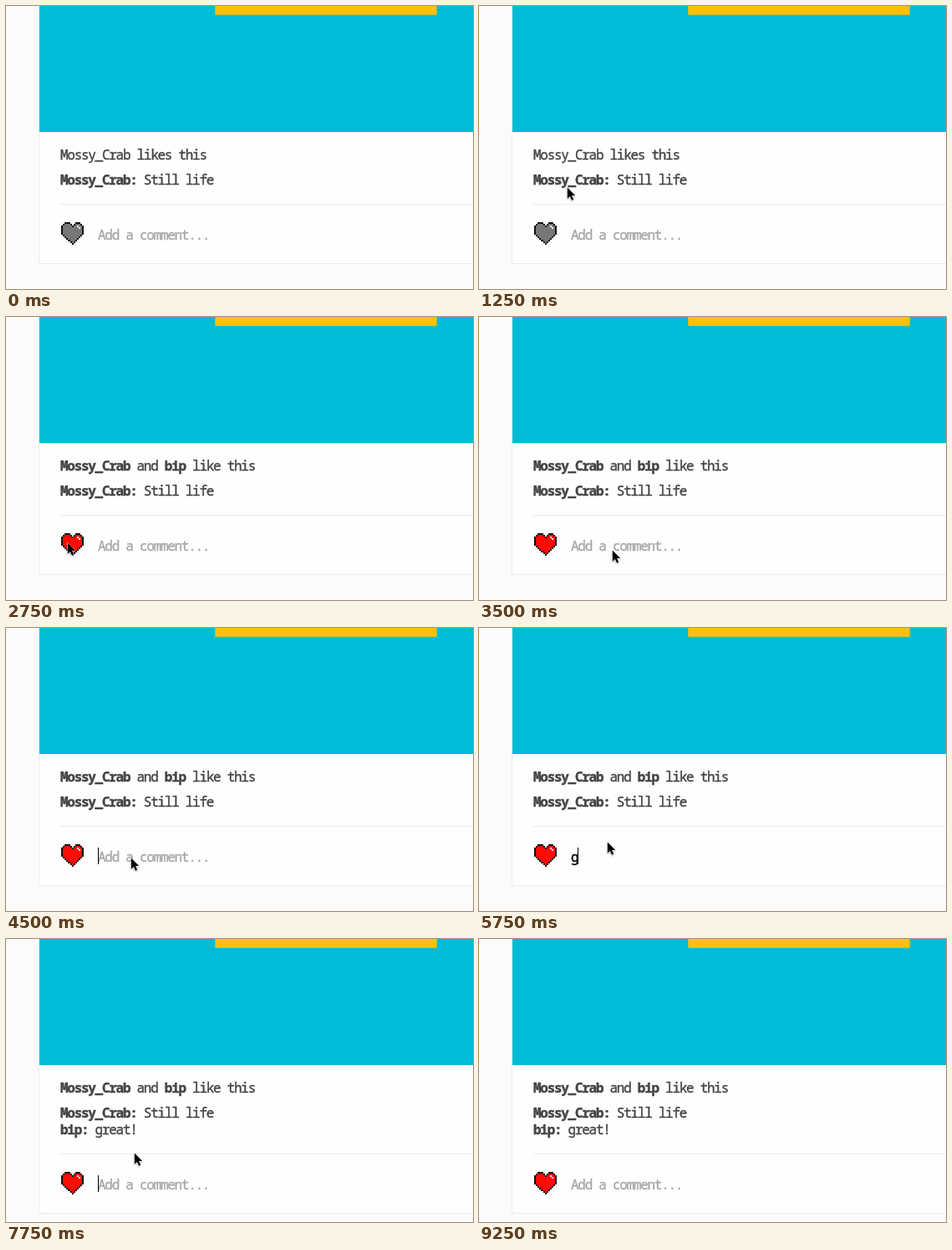
An HTML page for the animation above (9.75 s loop, 559 px wide and 339 px high).

```html
<!DOCTYPE html>
<html lang="en">
<head>
<meta charset="utf-8">
<title>Like and comment</title>
<style>
  html, body { margin: 0; width: 100%; height: 100%; overflow: hidden; background: #fbfbfb; }
  svg { display: block; width: 100%; height: 100%; }
  text {
    font: 16px "Noto Sans Mono", "DejaVu Sans Mono", monospace;
    letter-spacing: -1.28px;
    white-space: pre;
    fill: #444;
    stroke: #444;
    stroke-width: 0.4px;
  }
  .b { font-weight: 700; }
  .crisp { shape-rendering: crispEdges; }
  #entry { fill: #000; stroke: #000; }
  #entry.empty { fill: #a8a8a8; stroke: #a8a8a8; }
  #pointer { filter: drop-shadow(0 1px 1px rgba(0, 0, 0, .3)); }
</style>
</head>
<body>
<svg viewBox="0 0 559 339">
  <rect width="559" height="339" fill="#fbfbfb"/>
  <g class="crisp">
    <rect id="card" x="39" y="-2" width="540" height="311" fill="#ececec"/>
    <rect id="face" x="40" y="-2" width="540" height="310" fill="#fefefe"/>
    <rect x="40" width="519" height="151" fill="#00bcd6"/>
  </g>
  <rect x="250.3" y="-2" width="265.4" height="12.7" fill="#ffc107"/>
  <text id="before" x="65" y="184">Mossy_Crab likes this</text>
  <text id="after" x="65" y="184"><tspan class="b">Mossy_Crab</tspan> and <tspan class="b">bip</tspan> like this</text>
  <text x="65" y="214"><tspan class="b">Mossy_Crab:</tspan> Still life</text>
  <text id="reply" x="65" y="234"><tspan class="b">bip:</tspan> great!</text>
  <g id="form">
    <rect class="crisp" x="65" y="237" width="494" height="1" fill="#ececec"/>
    <g id="heart" class="crisp" transform="translate(66 259) scale(2.1)">
      <path id="edge" fill="#111"/>
      <path id="fill"/>
      <path d="M9 2h1v1h1v1h-1v-1h-1z" fill="#fff"/>
    </g>
    <text id="entry" x="110" y="280"></text>
    <rect id="caret" class="crisp" x="110" y="263" width="1" height="20"/>
  </g>
  <g id="pointer">
    <path d="M0 0V16L3.8 12.6L6.4 18.4L9 17.2L6.4 11.6H11.4Z" transform="translate(.8 .6) scale(.82)"
          stroke="#fff" stroke-width="1.2" paint-order="stroke"/>
  </g>
</svg>
<script>
const LOOP = 9750, TICK = 250, BLINK = 500;
const LIKED = 2750, FOCUS = 4250, TYPING = 5750, SENT = 7750;
const CHAR = 8.32, WORD = "great!", HINT = "Add a comment...";
const $ = id => document.getElementById(id);

// The last key comes after a short pause.
const keys = [...WORD].map((c, i) => TYPING + i * TICK + (c === "!" ? BLINK : 0));
const taps = [FOCUS, ...keys, SENT];

// Pointer stops: time, x, y.
const PATH = [
  [750, 135, 159], [1750, 75, 275], [2000, 75, 275], [2250, 73, 270],
  [LIKED, 73, 270], [3500, 159, 279], [3750, 157, 285], [4000, 157, 285],
  [4500, 149, 275], [4750, 153, 256], [8500, 153, 256], [9000, 248, 124]
];

function pointerAt(t) {
  const i = PATH.findLastIndex(p => p[0] <= t);
  if (i < 0 || t > PATH.at(-1)[0]) return null;
  const a = PATH[i], b = PATH[i + 1] || a;
  const u = (t - a[0]) / (b[0] - a[0] || 1), ease = u * u * (3 - 2 * u);
  return [1, 2].map(k => a[k] + (b[k] - a[k]) * ease);
}

function caretAt(t) {
  const last = taps.findLast(s => s <= t);
  return last !== undefined && Math.floor((t - last) / BLINK) % 2 === 0;
}

// Two stepped lobes on top, a diagonal taper below.
function inHeart(x, y) {
  const dx = Math.abs(x - 6);
  return y >= 0 && dx <= 6 && dx + y <= 12 && Math.abs(dx - 3) <= y + 1;
}

function buildHeart() {
  let edge = "", fill = "";
  for (let y = 0; y < 13; y++) {
    for (let x = 0; x < 13; x++) {
      if (!inHeart(x, y)) continue;
      const cell = `M${x} ${y}h1v1h-1z`;
      const inner = inHeart(x - 1, y) && inHeart(x + 1, y) && inHeart(x, y - 1) && inHeart(x, y + 1);
      if (inner) fill += cell;
      else edge += cell;
    }
  }
  $("edge").setAttribute("d", edge);
  $("fill").setAttribute("d", fill);
}

const show = (id, on) => $(id).setAttribute("visibility", on ? "visible" : "hidden");

function draw(t) {
  const liked = t >= LIKED, sent = t >= SENT, shift = sent ? 20 : 0;
  const n = sent ? 0 : keys.filter(k => k <= t).length;
  const tip = pointerAt(t);

  show("before", !liked);
  show("after", liked);
  show("reply", sent);
  $("fill").setAttribute("fill", liked ? "#ff0a05" : "#777");

  $("card").setAttribute("height", 311 + shift);
  $("face").setAttribute("height", 310 + shift);
  $("form").setAttribute("transform", `translate(0 ${shift})`);

  $("entry").textContent = n ? WORD.slice(0, n) : HINT;
  $("entry").classList.toggle("empty", !n);
  $("caret").setAttribute("x", Math.round(110 + n * CHAR));
  show("caret", caretAt(t));

  show("pointer", tip);
  if (tip) $("pointer").setAttribute("transform", `translate(${tip})`);
}

buildHeart();
const start = performance.now();
function frame() {
  const t = (performance.now() - start) % LOOP;
  draw(t - t % TICK);
  requestAnimationFrame(frame);
}
frame();
</script>
</body>
</html>
```
